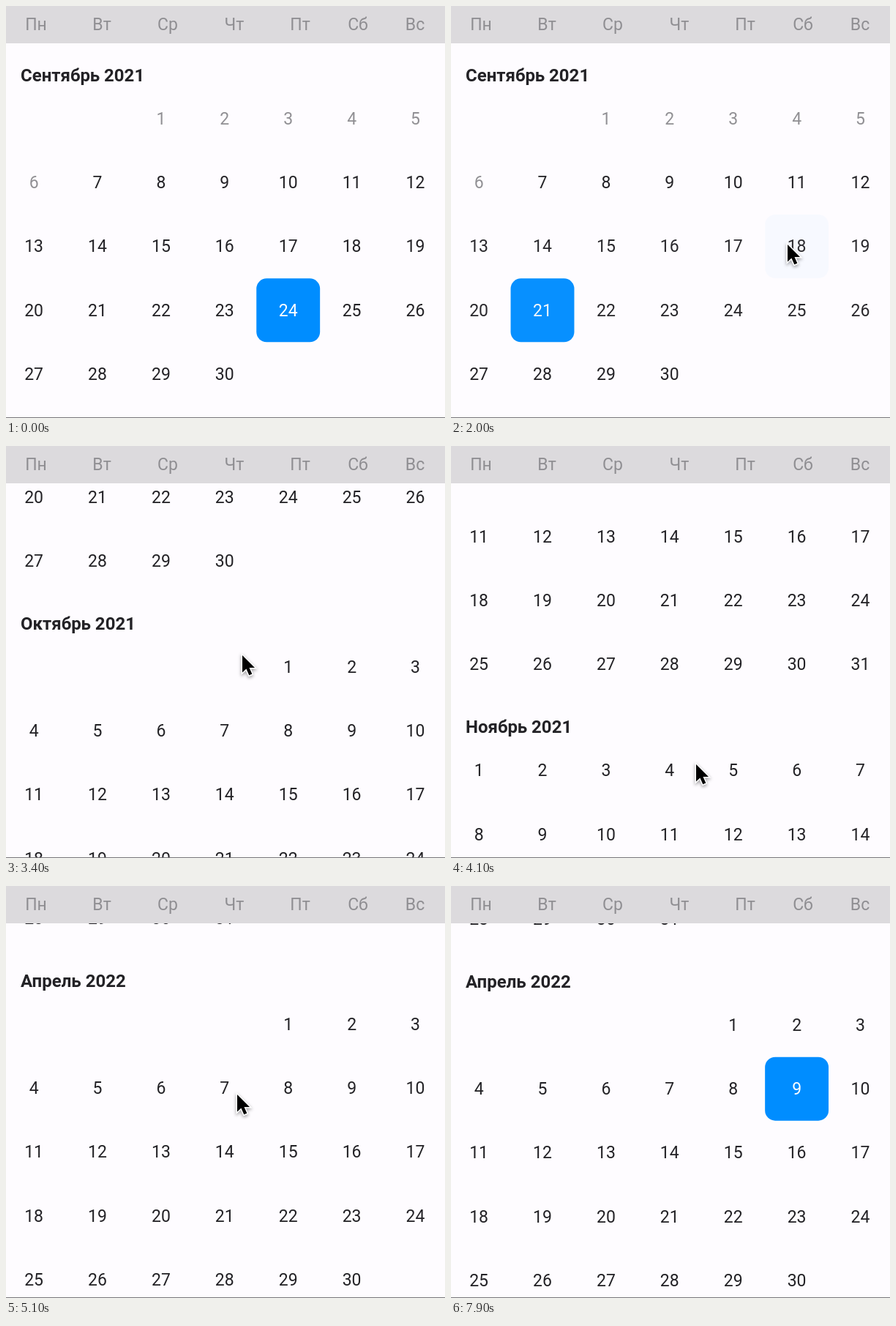
Write an HTML page with a canvas that moves like this. It is 600 px wide and 563 px high and loops after 8 s.

```html
<!DOCTYPE html>
<html lang="ru">
<head>
<meta charset="utf-8">
<title>Календарь</title>
<style>
  html, body { margin: 0; width: 100%; height: 100%; overflow: hidden; background: #fefcff; }
  canvas { display: block; }
</style>
</head>
<body>
<canvas id="stage" width="600" height="563"></canvas>
<script>
const ctx = document.getElementById('stage').getContext('2d');
const LOOP = 8000, FADE = 420;
const COL = 86.9, ROW = 87.3, HEADER = 51;
const TITLE_TO_DAYS = 59.6, DAYS_TO_TITLE = 85.4;
const PAPER = '#fefcff', BLUE = '#008dff';
const INK = [35, 34, 38], FADED = [145, 144, 148], WHITE = [255, 255, 255];

const weekdays = [['Пн', 41], ['Вт', 131], ['Ср', 221], ['Чт', 312], ['Пт', 402], ['Сб', 481], ['Вс', 559]];
const names = ['Январь', 'Февраль', 'Март', 'Апрель', 'Май', 'Июнь', 'Июль',
  'Август', 'Сентябрь', 'Октябрь', 'Ноябрь', 'Декабрь'];

// start time, month index, day
const taps = [
  [-1000, 0, 24], [420, 0, 9], [1360, 0, 21], [1960, 0, 18],
  [2465, 0, 9], [5260, 7, 7], [6110, 7, 21], [6660, 7, 9]
];

// time, offset, easing towards this step
const scrollSteps = [
  [3000, 0], [3300, 170, 'in'], [4100, 699, 'out'], [4180, 699],
  [4360, 930, 'in'], [5100, 3511.7, 'out'], [5200, 3510.7]
];

// time, x, y of the pointer tip
const pointerSteps = [
  [200, 380, 405], [420, 300, 225], [950, 300, 225], [1200, 109, 416],
  [1560, 109, 416], [1800, 459, 325], [2120, 459, 325], [2400, 264, 211],
  [2720, 264, 211], [3000, 328, 435], [3300, 322, 285], [3550, 322, 285],
  [3900, 334, 434], [4180, 334, 434], [4360, 315, 284], [5500, 315, 284],
  [5900, 300, 412], [6250, 300, 412], [6500, 456, 259], [7050, 456, 259], [7400, 466, 512]
];
const POINTER_SHOWN = [200, 7500];

const easings = {
  in: p => p * p,
  out: p => 1 - (1 - p) ** 3,
  smooth: p => p * p * (3 - 2 * p)
};
const clamp = p => Math.max(0, Math.min(1, p));
const mix = (a, b, p) => a + (b - a) * p;
const rgb = (a, b, p) => `rgb(${a.map((v, i) => Math.round(mix(v, b[i], p)))})`;

function between(steps, t) {
  const next = steps.findIndex(step => step[0] > t);
  if (next === 0) return [steps[0], steps[0], 0];
  if (next < 0) return [steps.at(-1), steps.at(-1), 0];
  const a = steps[next - 1], b = steps[next];
  return [a, b, (t - a[0]) / (b[0] - a[0])];
}

function scrollAt(t) {
  const [a, b, p] = between(scrollSteps, t);
  return mix(a[1], b[1], (easings[b[2]] || (v => v))(p));
}

let nextTitle = 94;
const months = Array.from({ length: 9 }, (_, i) => {
  const first = new Date(2021, 8 + i, 1);
  const year = first.getFullYear(), month = first.getMonth();
  const lead = (first.getDay() + 6) % 7;
  const days = new Date(year, month + 1, 0).getDate();
  const rows = Math.ceil((lead + days) / 7);
  const y = nextTitle;
  nextTitle += TITLE_TO_DAYS + (rows - 1) * ROW + DAYS_TO_TITLE;
  return { title: `${names[month]} ${year}`, lead, days, y };
});

const rowOf = (month, day) => Math.floor((months[month].lead + day - 1) / 7);

function selectionAt(t) {
  const i = taps.findLastIndex(tap => tap[0] <= t);
  return { now: taps[i], before: taps[i - 1], p: easings.smooth(clamp((t - taps[i][0]) / FADE)) };
}

function text(value, x, y, color, font = '23px', align = 'center') {
  ctx.font = `${font} Roboto, sans-serif`;
  ctx.textAlign = align;
  ctx.fillStyle = color;
  ctx.fillText(value, x, y);
}

function drawDay(month, day, scroll, selection) {
  const { lead, y: top } = months[month];
  const row = rowOf(month, day);
  const x = 38.1 + (lead + day - 1) % 7 * COL;
  const y = top + TITLE_TO_DAYS + row * ROW - scroll;
  if (y < -50 || y > 620) return;

  const { now, before, p } = selection;
  const isDay = tap => tap && tap[1] === month && tap[2] === day;
  const inRow = tap => tap && tap[1] === month && rowOf(month, tap[2]) === row;
  const chosen = isDay(now) ? p : isDay(before) ? 1 - p : 0;
  if (chosen > 0) {
    ctx.globalAlpha = chosen;
    ctx.fillStyle = BLUE;
    ctx.beginPath();
    ctx.roundRect(x - COL / 2, y - 43.2, COL, 87, 14);
    ctx.fill();
  }
  ctx.globalAlpha = inRow(now) || inRow(before) ? 1 - p * (1 - p) : 1;
  const base = month === 0 && day < 7 ? FADED : INK;
  text(day, x, y + 8.2, rgb(base, WHITE, chosen));
  ctx.globalAlpha = 1;
}

const arrow = new Path2D('M0 0V23.5L5.4 18.4L9.3 27.3L13.3 25.6L9.5 16.9H17Z');

function drawPointer(t) {
  if (t < POINTER_SHOWN[0] || t >= POINTER_SHOWN[1]) return;
  const [a, b, p] = between(pointerSteps, t);
  const q = easings.smooth(p);
  ctx.save();
  ctx.translate(mix(a[1], b[1], q) + 1, mix(a[2], b[2], q) + 1);
  ctx.lineWidth = 3;
  ctx.strokeStyle = '#fff';
  ctx.shadowColor = 'rgba(0,0,0,.4)';
  ctx.shadowBlur = 4;
  ctx.shadowOffsetY = 2;
  ctx.stroke(arrow);
  ctx.shadowColor = 'transparent';
  ctx.fillStyle = '#000';
  ctx.fill(arrow);
  ctx.restore();
}

function draw(t) {
  const scroll = scrollAt(t), selection = selectionAt(t);
  ctx.fillStyle = PAPER;
  ctx.fillRect(0, 0, 600, 563);
  months.forEach((month, i) => {
    text(month.title, 20, month.y - scroll + 8.5, rgb(INK, INK, 0), 'bold 24px', 'left');
    for (let day = 1; day <= month.days; day++) drawDay(i, day, scroll, selection);
  });
  ctx.fillStyle = '#dcdadd';
  ctx.fillRect(0, 0, 600, HEADER);
  weekdays.forEach(([name, x]) => text(name, x, 33, '#8f8e92'));
  ctx.fillStyle = '#77767a';
  ctx.fillRect(0, 562, 600, 1);
  drawPointer(t);
}

const start = performance.now();
function tick() {
  draw((performance.now() - start) % LOOP);
  requestAnimationFrame(tick);
}
tick();
</script>
</body>
</html>
```
